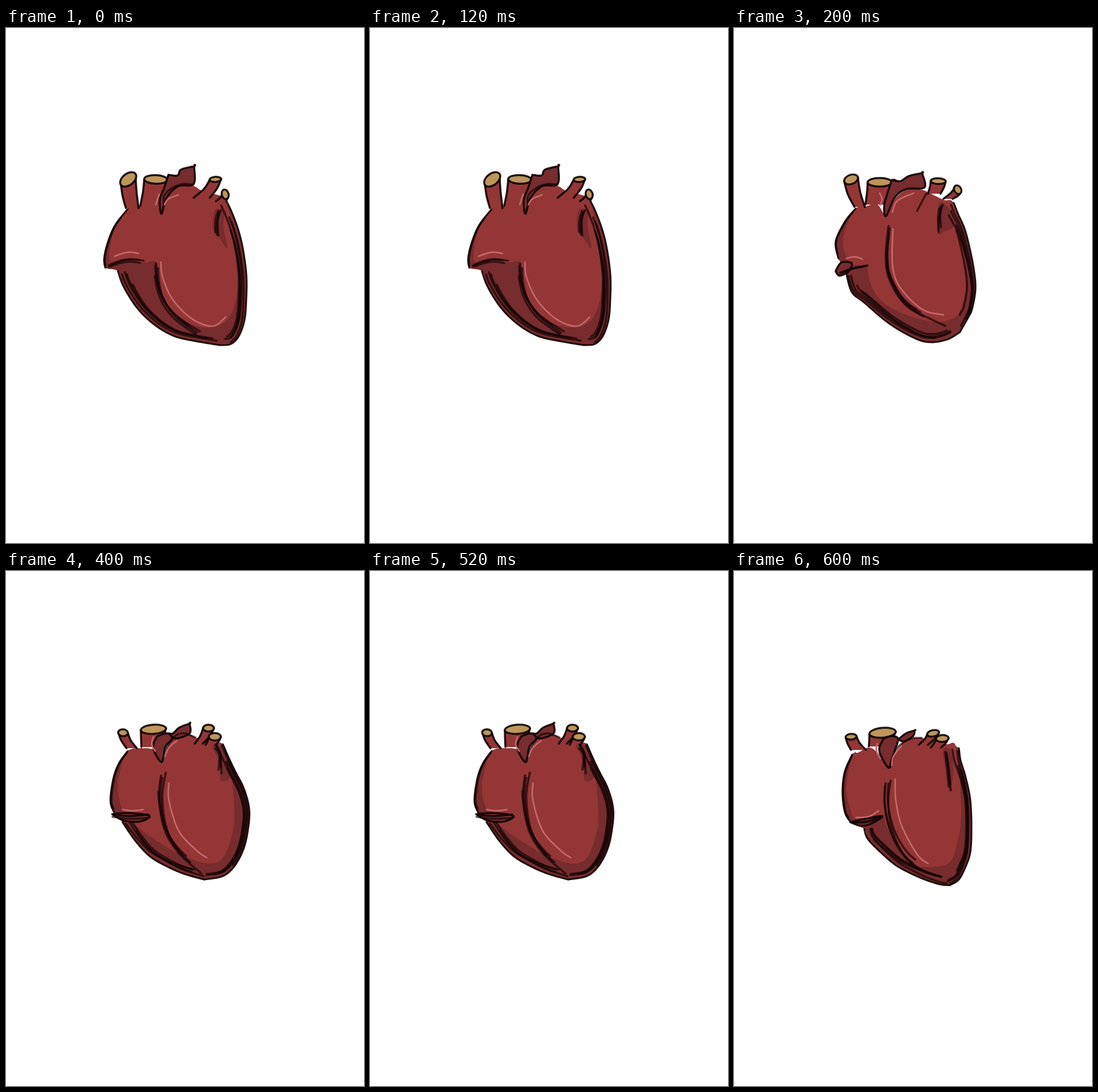
These frames come from a looping animation (624x898 px, 800 ms). An HTML page with a canvas:

```html
<!DOCTYPE html>
<html lang="en">
<head>
<meta charset="utf-8">
<title>Beating heart</title>
<style>
  html, body { margin: 0; width: 100%; height: 100%; overflow: hidden; background: #fff; }
  canvas { display: block; width: 100%; height: 100%; }
</style>
</head>
<body>
<canvas id="stage" width="624" height="898"></canvas>
<script>
const ctx = document.getElementById('stage').getContext('2d');
const RED = '#943636', DARK = '#772c2d', PINK = '#c4686b', TAN = '#be965a';
const EDGE = 'rgba(12,2,2,.9)', INK = 'rgba(18,3,3,.68)';
const HOLD = 200;
ctx.lineCap = ctx.lineJoin = 'round';

let seed = 1;
const rnd = () => (seed = seed * 16807 % 2147483647) / 2147483647;
const between = (a, b) => a + (b - a) * rnd();
const mix = (a, b, t) => a + (b - a) * t;
const points = text => text.split(' ').map(s => s.split(',').map(Number));

// Catmull-Rom curve sampled into short steps; a repeated point makes a corner.
function smooth(p, closed, steps = 10) {
  const n = p.length, out = [];
  const at = i => closed ? p[(i + n) % n] : p[Math.max(0, Math.min(n - 1, i))];
  for (let i = 0; i < (closed ? n : n - 1); i++) {
    const [a, b, c, d] = [at(i - 1), at(i), at(i + 1), at(i + 2)];
    for (let k = 0; k < steps; k++) {
      const t = k / steps;
      out.push([0, 1].map(j => b[j] + t / 2 * (c[j] - a[j]
        + t * (2 * a[j] - 5 * b[j] + 4 * c[j] - d[j])
        + t * t * (3 * (b[j] - c[j]) + d[j] - a[j]))));
    }
  }
  if (!closed) out.push(p[n - 1]);
  return out;
}

function trace(dots) {
  ctx.beginPath();
  dots.forEach(d => ctx.lineTo(...d));
}

function stroke(dots, width, color) {
  trace(dots);
  ctx.lineWidth = width;
  ctx.strokeStyle = color;
  ctx.stroke();
}

function fill(p, color) {
  trace(smooth(p, true));
  ctx.fillStyle = color;
  ctx.fill();
}

const line = (p, width = 3, color = EDGE) => stroke(smooth(p), width, color);

// Loose repeated strokes along a curve, drifting between two offsets.
function sketch(p, count, near, far, width = 3.6) {
  const dots = smooth(p), last = dots.length - 1;
  const side = dots.map((d, i) => {
    const a = dots[Math.max(0, i - 1)], b = dots[Math.min(last, i + 1)];
    const dx = b[0] - a[0], dy = b[1] - a[1], len = Math.hypot(dx, dy) || 1;
    return [dy / len, -dx / len];
  });
  for (let n = 0; n < count; n++) {
    const from = between(near, far), to = between(near, far);
    const start = Math.floor(last * between(0, .25)), end = Math.ceil(last * between(.75, 1));
    const pass = [];
    for (let i = start; i <= end; i++) {
      const off = mix(from, to, (i - start) / (end - start));
      pass.push([dots[i][0] + side[i][0] * off, dots[i][1] + side[i][1] * off]);
    }
    stroke(pass, width, INK);
  }
}

// Vessel from its open end down to a base of half width bw.
function vessel([x, y, rx, ry, deg, bx, by, bw]) {
  const turn = deg * Math.PI / 180;
  const wall = s => {
    const a = [x + s * rx * Math.cos(turn), y + s * rx * Math.sin(turn)];
    const b = [bx + s * bw, by];
    return [a, [mix(a[0], b[0], .35), mix(a[1], b[1], .5)], b];
  };
  const left = wall(-1), right = wall(1);
  trace([...smooth(left), ...smooth(right).reverse()]);
  ctx.fillStyle = RED;
  ctx.fill();
  line(left, 3.5);
  line(right, 3.5);
  ctx.beginPath();
  ctx.ellipse(x, y, rx, ry, turn, 0, Math.PI * 2);
  ctx.fillStyle = TAN;
  ctx.fill();
  ctx.lineWidth = 3.4;
  ctx.stroke();
}

function drawHeart(pose, index) {
  seed = 71 + index * 13;
  const [atrium, base, side, top, lit, groove] =
    [pose.atrium, pose.base, pose.side, pose.top, pose.lit, pose.groove].map(points);
  fill([...atrium, ...base, ...side, ...top], DARK);
  fill([...lit, ...top], RED);
  fill(points(pose.patch), DARK);
  [atrium, base, side].forEach(p => line(p));
  sketch(atrium, 1, 1, 3, 3);
  sketch(base, 4, 2, 16);
  sketch(side, 5, 2, pose.rim);
  sketch(groove, 4, -5, 5);
  pose.vessels.forEach(vessel);
  pose.flaps.map(points).forEach(p => {
    fill(p, DARK);
    stroke(smooth([...p, p[0]]), 3.4, EDGE);
  });
  line(points(pose.arch), 3.4, INK);
  sketch(points(pose.fold), 3, -4, 3, 3.4);
  sketch(points(pose.mark), 3, -4, 4);
  pose.shines.forEach(s => line(points(s), 2.7, PINK));
}

const poses = [
  {
    atrium: '212,316 190,344 177,375 171,402 173,418',
    base: '195,424 203,447 219,475 238,499 265,522 295,538 330,546 372,553',
    side: '373,553 392,551 406,537 416,508 419,470 419,430 413,385 405,352 394,322 385,303',
    top: '374,293 345,286 328,276 310,273 290,282 272,298 250,302 230,311',
    lit: '212,314 190,350 182,380 183,408 215,404 242,409 262,408 266,440 276,472 300,506 345,522 380,514 398,485 404,440 400,370 386,310',
    groove: '261,402 263,440 273,474 295,504 335,533',
    patch: '364,318 380,320 379,345 386,384 372,366 361,350',
    vessels: [[213, 264, 16, 10, -38, 220, 314, 11], [261, 264, 20, 7.5, 2, 252, 310, 18],
      [365, 264, 10, 4.5, -4, 341, 296, 14], [382, 290, 6, 8.5, -15, 375, 302, 9]],
    flaps: ['283,256 299,257 305,247 328,241 328,241 327,272 300,276 280,296 271,324 268,300 276,278'],
    arch: '275,309 276,292 291,278 309,272 327,273',
    fold: '174,417 190,409 215,404 244,408',
    mark: '372,317 367,336 367,362',
    shines: ['189,398 212,391 231,393', '270,408 273,435 291,474 324,507 360,520 383,504',
      '276,308 283,298 300,291', '261,308 267,290']
  },
  {
    atrium: '212,315 195,335 180,363 177,380 182,402',
    base: '195,425 205,460 226,478 270,515 315,541 343,548 372,543 393,531',
    side: '394,530 408,505 415,490 421,455 418,420 410,380 402,350 391,325 383,305',
    top: '366,300 345,290 330,283 312,281 295,285 278,302 265,328 250,308 230,311',
    lit: '212,315 196,345 190,372 194,395 205,412 230,416 236,440 250,468 285,494 345,512 378,508 396,490 404,450 402,410 392,345 382,304',
    groove: '267,345 264,400 273,440 305,484 370,516',
    patch: '357,306 374,313 384,334 382,348 369,353 356,358',
    vessels: [[204, 264, 12.5, 8, -20, 219, 312, 9], [254, 269, 21, 7.5, 0, 246, 308, 17],
      [356, 267, 13, 5, 2, 349, 289, 11], [390, 282, 8, 6, 62, 373, 298, 8]],
    flaps: ['275,265 290,267 305,258 328,253 328,253 332,278 300,281 280,296 265,328 262,308',
      '177,424 187,409 205,410 200,424 184,432'],
    arch: '335,289 327,304 319,319',
    fold: '185,430 207,420 234,413',
    mark: '363,308 359,330 359,357',
    shines: ['196,402 210,399 224,403', '277,350 276,410 285,445 310,476 335,494 365,500',
      '254,288 258,298 255,309', '276,321 285,301 313,288']
  },
  {
    atrium: '212,314 197,335 187,362 182,402 190,424',
    base: '203,438 225,470 250,497 280,515 310,528 345,538',
    side: '346,538 378,532 398,515 414,485 422,450 424,415 415,380 400,350 388,325 378,302',
    top: '358,297 332,291 314,283 297,288 282,306 273,333 260,313 236,309',
    lit: '212,314 200,344 195,380 203,416 222,440 255,465 300,492 350,510 378,500 394,460 398,420 392,350 380,305',
    groove: '274,351 270,395 280,450 305,490 346,526',
    patch: '359,302 378,307 390,330 390,360 374,365 372,335',
    vessels: [[204, 282, 8.5, 6, 5, 219, 309, 9], [257, 276, 22, 8, -4, 250, 307, 14],
      [353, 274, 9.5, 6, 0, 336, 301, 7], [364, 289, 10.5, 6.5, 0, 357, 303, 9]],
    flaps: ['284,283 291,283 302,273 320,266 320,266 320,283 295,292',
      '264,288 281,283 290,293 278,306 272,333 260,318 257,302',
      '185,424 215,422 250,427 233,437 205,435'],
    arch: '273,329 281,307 292,290 309,283 330,290',
    fold: '186,426 215,429 248,427',
    mark: '362,304 372,320 373,355',
    shines: ['284,370 284,400 301,453 332,487 350,500', '277,323 284,308 298,296',
      '203,416 220,418 239,416', '257,289 254,302 260,314']
  },
  {
    atrium: '206,320 193,350 189,385 193,420 203,438',
    base: '227,450 233,467 255,490 285,515 325,535 357,546 375,548',
    side: '376,548 392,538 404,515 412,490 414,450 412,400 404,360 395,330 392,309',
    top: '370,302 345,295 320,291 297,297 281,318 271,342 253,320 236,308 216,317',
    lit: '209,318 199,350 196,385 203,415 214,434 258,424 264,440 278,470 306,510 345,516 376,508 390,470 396,420 388,310',
    groove: '269,353 266,405 277,455 300,495 330,519',
    patch: '364,314 378,312 382,350 376,385 371,355',
    vessels: [[204, 289, 9.5, 5, -5, 217, 312, 13], [259, 282, 23, 8.5, -5, 249, 306, 14],
      [347, 283, 10.5, 5.5, -12, 330, 303, 8], [363, 292, 11, 6, -4, 352, 308, 9]],
    flaps: ['286,294 300,283 315,278 315,278 312,288 297,297',
      '261,292 275,288 286,293 279,317 271,343 259,328 253,310',
      '203,438 228,432 258,428 238,441 220,444'],
    arch: '271,342 279,317 291,302 309,292 327,291',
    fold: '205,438 230,437 256,429',
    mark: '370,315 374,345 378,385',
    rim: 12,
    shines: ['281,363 282,400 293,446 320,495 338,510', '213,430 235,428 252,418',
      '250,301 248,313 255,327', '275,339 278,323 292,305']
  }
];

let shown = -1;

function tick() {
  const i = Math.floor(performance.now() / HOLD) % poses.length;
  if (i !== shown) {
    ctx.clearRect(0, 0, 624, 898);
    drawHeart({ rim: 16, ...poses[i] }, i);
    shown = i;
  }
  requestAnimationFrame(tick);
}
tick();
</script>
</body>
</html>
```
